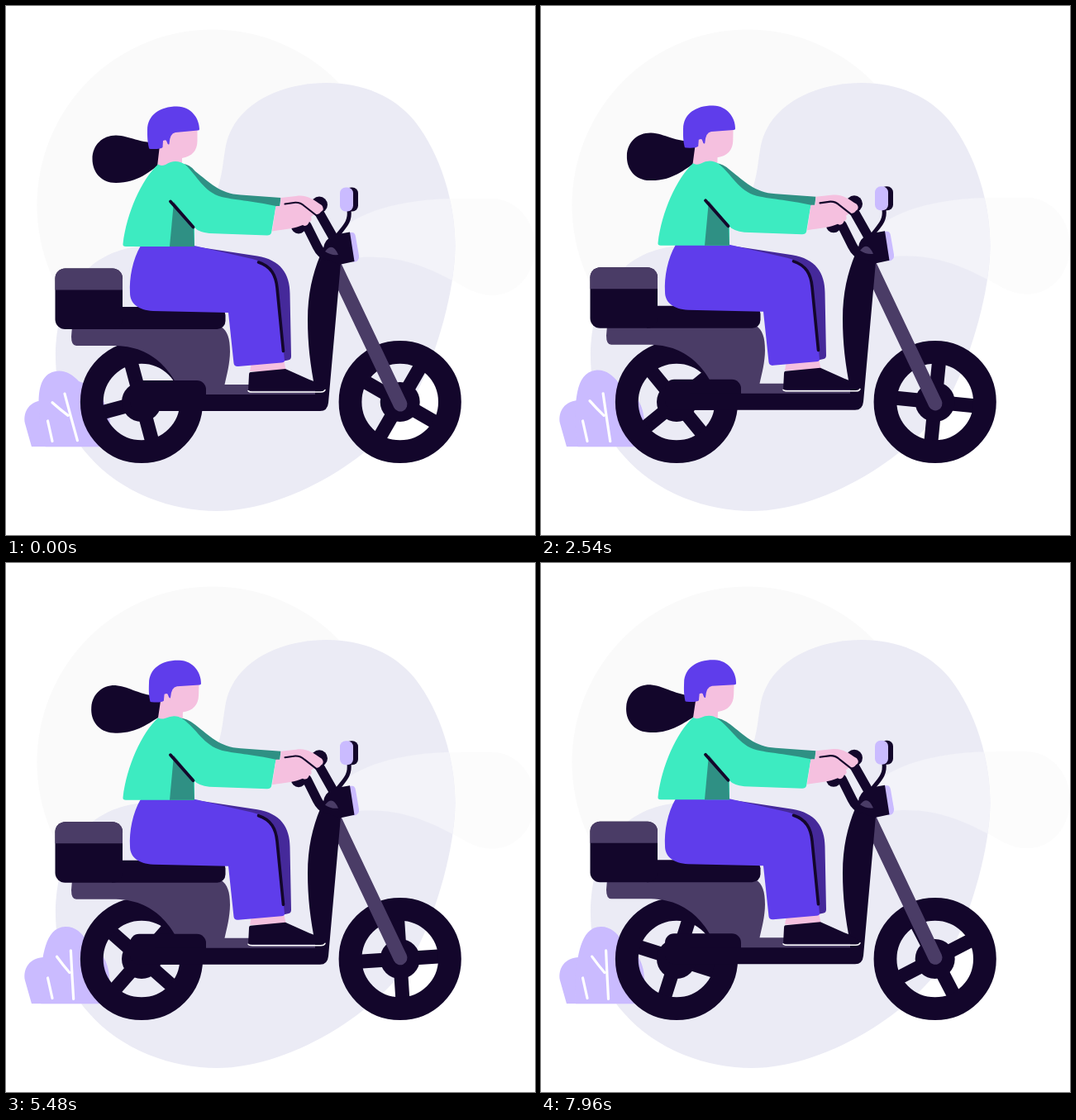
An HTML page with a canvas for the animation above (8 s loop, 640x640 px).

```html
<!DOCTYPE html>
<html lang="en">
<head>
<meta charset="utf-8">
<title>Scooter ride</title>
<style>
html, body { margin: 0; width: 100%; height: 100%; overflow: hidden; background: #fff; }
canvas { display: block; width: 640px; height: 640px; }
</style>
</head>
<body>
<canvas id="stage"></canvas>
<script>
const canvas = document.getElementById('stage');
const ctx = canvas.getContext('2d');
const scale = window.devicePixelRatio || 1;
canvas.width = canvas.height = 640 * scale;

const INK = '#13062b', PLUM = '#4a3c66', LILAC = '#cabbff', VIOLET = '#5f3deb',
  INDIGO = '#45299a', SKIN = '#f5c0df', MINT = '#3debc1', TEAL = '#2f9084',
  MIST = '#ebebf5', PALE = '#fafafa';

const LOOP = 8000, BEAT = 1120, LEAD = 120;
const TICKS = [0, 100, 220, 320, 440, 560, 700, 780, 880, 1000];

// Pose values at a few moments, linear in between
const TIMES = [0, 1800, 3240, 4360, 5480, 7160, 7960];
const BOB = [0, -0.6, -1.8, -3.1, -4.3, -5.5, -4.7];
const NOD = [0, 0.35, 0.55, 0.75, 0.85, 1, 0.9];
const HAIR = [0, 1.4, 2.5, 3.2, 4.4, 5.5, 4.8];
const SWAY = [-13, -7.7, -4.5, -2.7, -1, 0, -0.6];

function at(values, t) {
  let i = 0;
  while (i < TIMES.length - 2 && t > TIMES[i + 1]) i++;
  const k = Math.min(1, (t - TIMES[i]) / (TIMES[i + 1] - TIMES[i]));
  return values[i] + (values[i + 1] - values[i]) * k;
}

function held(t) {
  if (t < LEAD) return 0;
  const u = t - LEAD, beat = Math.floor(u / BEAT) * BEAT;
  return LEAD + beat + TICKS.filter(x => x <= u - beat).pop();
}

function fill(d, color) {
  ctx.fillStyle = color;
  ctx.fill(new Path2D(d));
}

function line(d, color, width, cap = 'round') {
  ctx.strokeStyle = color;
  ctx.lineWidth = width;
  ctx.lineCap = cap;
  ctx.lineJoin = 'round';
  ctx.stroke(new Path2D(d));
}

function disc(x, y, r, color) {
  ctx.fillStyle = color;
  ctx.beginPath();
  ctx.arc(x, y, r, 0, Math.PI * 2);
  ctx.fill();
}

function box(x, y, w, h, r, color) {
  ctx.fillStyle = color;
  ctx.beginPath();
  ctx.roundRect(x, y, w, h, r);
  ctx.fill();
}

function turned(x, y, deg, draw) {
  ctx.save();
  ctx.translate(x, y);
  ctx.rotate(deg * Math.PI / 180);
  ctx.translate(-x, -y);
  draw();
  ctx.restore();
}

function shifted(dx, dy, draw) {
  ctx.save();
  ctx.translate(dx, dy);
  draw();
  ctx.restore();
}

const BLOB = 'M388 93C432 93 470 109 495 140C526 180 543.500 238 543.500 290C543 345 522 418 497 468C462 535 350 611 255 611C202 611 139 590 99 543C72 513 60 462 60 425C60 345 100 298 160 291C235 282 255 240 262 195C266 170 265 162 277 142C300 108 345 93 388 93Z';
const CLOUD = 'M400 275C425 250 475 233 550 233H588C617 233 640 260 640 291C640 324 618 350 588 350C567 350 553 338 538 331C508 315 470 299 420 305H395Z';

function backdrop(bob) {
  disc(250, 241, 212.5, PALE);
  shifted(0, bob, () => fill(CLOUD, '#fcfcfc'));
  fill(BLOB, MIST);
  ctx.save();
  ctx.clip(new Path2D(BLOB));
  shifted(0, bob, () => fill(CLOUD, '#f3f3f9'));
  ctx.restore();
}

function bush(sway) {
  ctx.save();
  ctx.beginPath();
  ctx.rect(0, 400, 200, 133.3);
  ctx.clip();
  fill('M31 533.3L23 505C20 491 29 477 46 477C62 479 70 500 112 505V533.3Z', LILAC);
  shifted(0, sway * 0.13, () => turned(83, 505, sway, () => {
    fill('M41 500C45 480 47 440 73 440C85 440 93 448 99 458C118 470 125 487 125 503C127 515 121 525 117 545H42Z', LILAC);
    line('M79 469Q80 500 81.3 527.5M62 476Q69 486 77 495.5', '#fff', 3.2);
  }));
  line('M50.5 502L56 526.5', '#fff', 3.2);
  ctx.restore();
}

function wheel(x, deg) {
  const y = 479;
  turned(x, y, deg, () => {
    line(`M${x - 50} ${y}H${x + 50}M${x} ${y - 50}V${y + 50}`, INK, 17, 'butt');
  });
  disc(x, y, 24, INK);
  ctx.strokeStyle = INK;
  ctx.lineWidth = 27.8;
  ctx.beginPath();
  ctx.arc(x, y, 60.2, 0, Math.PI * 2);
  ctx.stroke();
}

function chassis() {
  fill('M80 388H260C268 393 271 402 271 418C271 432 267 447 264.500 458H384V471H213C205 453 186 412 133 411H85Q79 411 79 400Z', PLUM);
  box(150, 453, 92, 37, 11, INK);
  fill('M180 470H374L374 464C368 435 365 408 365 380C365 348 371 324 380 302Q392 296 405 311L390 480Q389 490 380 490H180Z', INK);
  box(128, 364, 137.500, 27, [0, 10, 10, 0], INK);
  box(59.5, 317.5, 81.500, 73.500, 12, INK);
  box(59.5, 317.5, 81.500, 26, [12, 12, 0, 0], PLUM);
}

function steering() {
  line('M415 247C417 262 408 268 400 279', INK, 5);
  box(410.500, 219.5, 15.500, 29, 7, INK);
  box(404, 219.5, 16, 29, 7, LILAC);
  disc(354, 266.500, 9, INK);
  line('M364 266L376.500 291Q381 300 388 302', INK, 11.500);
  disc(379, 240.500, 10, INK);
  line('M379.500 251L396.500 281', INK, 11.500);
  fill('M415 274H419Q422 274 423 279L427 302Q428 309 420 310Z', LILAC);
  fill('M384 293Q385 283 396 277L416 273.5L421.500 309L403 313L384 305Z', INK);
  fill('M386 297Q395 285 402 301Q393 302 386 297Z', PLUM);
}

function legs() {
  fill('M297 432L336 428L339 442H295Z', SKIN);
  fill('M296 443L338 439L367 452Q384 458 386 465.5H293L294 446Q294 443 296 443Z', INK);
  line('M293 465.5Q294 467 298 467H381Q385 467 386 464.5', '#fff', 1.5);
  fill('M222 290L304 302.5C332 307 343.5 324 343.5 348L345 424Q345 428 341 428.500L334 430L300 330Z', INDIGO);
  fill('M163 290H228L298 306C321 312 328 326 329.500 346L337 429Q337 431 333 431.5L281 436Q276 436.500 275.500 432L269 371L178 369C160 368 150 360 150 347C149 329 153 307 163 290Z', VIOLET);
  line('M305.500 310C321 315 326.500 326 328 341L335.500 417.500', INK, 3.6);
}

function head(nod, hair) {
  turned(186, 166, hair, () =>
    fill('M133 156.5C150 157 160 166 190 166L188 190C175 199 160 214 133 214C115 214 104.500 201 104.500 185C104.500 168 117 156.5 133 156.5Z', INK));
  shifted(nod, 0, () => turned(190, 188, nod * 2, () => {
    fill('M187 160L183 194Q198 200 213 193V184C225 182 231.500 175 231.500 163V146H194Z', SKIN);
    fill('M173 172C171 163 171 158 171 150C171 132 186 121.500 207 121.500C224 121.500 234 136 234 149Q234 150.500 232 150.500L205 153Q198 154 197.500 167Q196 169 194.500 164Q194 161 190 163L189.500 171Q187 173.500 175 173Q173 173 173 172Z', VIOLET);
  }));
}

function torso(nod) {
  const top = 188 + nod * 3, x = 217 - nod * 4, y = 192 + nod;
  fill(`M${x - 4} ${y - 1}Q${x + 5} ${y - 1} 229 200C246 213 258 227 284 228.500L332.500 232L331 243L260 240Z`, TEAL);
  fill(`M141.500 288C146 250 164 210 184 191.500Q187 194 193 192Q205 ${top - 4} ${x} ${y}C231 205 239 225 261 231C272 234 300 236 326.500 242L321 274.500Q320 277.500 316 277.500L246 275Q233 273.500 228 268V291H145Q141 291 141.500 288Z`, MINT);
  fill('M203 237L227 266L228 291H198Z', TEAL);
  line('M199 236.5L226.500 267.500', INK, 3.8);
}

function hands() {
  fill('M332.500 232L351 230C364 228 371 234 382 241Q386 246 381 249Q378 253 373 252L369 255Q371 260 367 261Q364 268 359 265C350 269 340 270 322 272.5L326.500 242H332Z', SKIN);
  line('M337.500 239.500L350 237.800Q356 237.500 361 242L375 253', INK, 2.1);
}

function render(t) {
  const bob = at(BOB, t), nod = at(NOD, t), spin = 75 + t * 0.0267;
  ctx.setTransform(scale, 0, 0, scale, 0, 0);
  ctx.fillStyle = '#fff';
  ctx.fillRect(0, 0, 640, 640);
  backdrop(bob);
  bush(at(SWAY, t));
  wheel(164, spin);
  wheel(476.700, spin + 45);
  shifted(0, bob, () => {
    line('M398 315.500L477 482', PLUM, 17);
    chassis();
    steering();
    legs();
    head(nod, at(HAIR, t));
    torso(nod);
    hands();
  });
}

const start = performance.now();
function loop() {
  render(held((performance.now() - start) % LOOP));
  requestAnimationFrame(loop);
}
loop();
</script>
</body>
</html>
```
